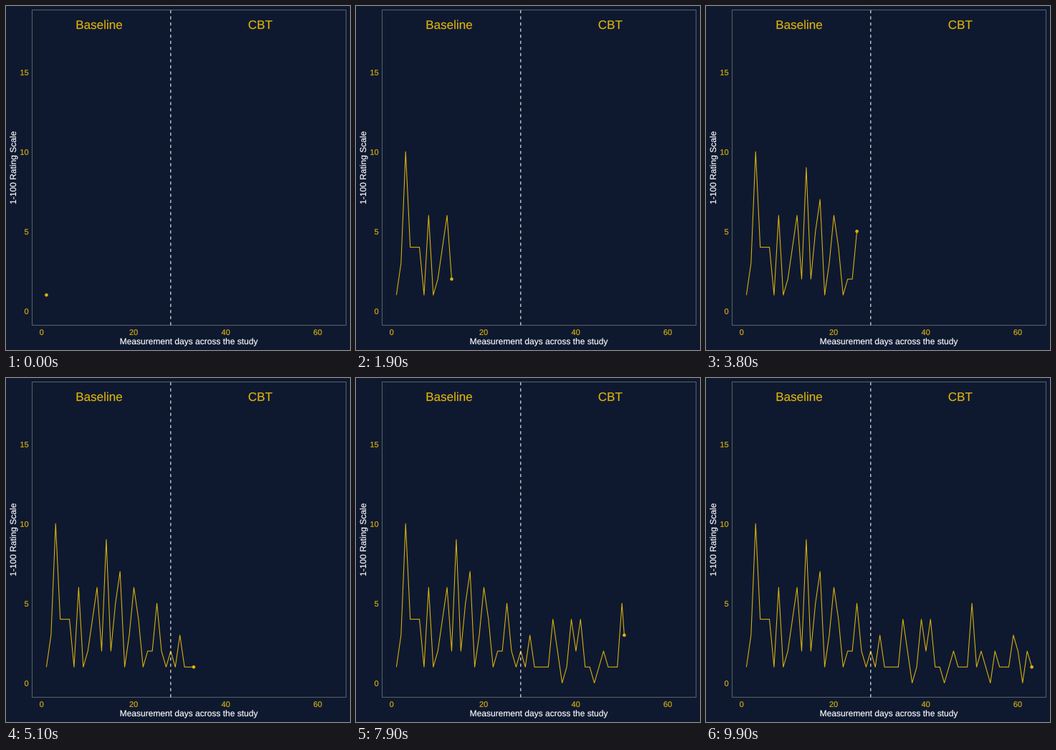
Animation of 480 by 480 pixels, one loop 10000 ms. Source, as a matplotlib script:

```python
import matplotlib.pyplot as plt
from matplotlib.animation import FuncAnimation
from matplotlib.patches import Circle, PathPatch, Rectangle
from matplotlib.textpath import TextPath
from matplotlib.transforms import Affine2D
import numpy as np

SIZE, DPI, FRAMES = 480, 72, 100
BG, GOLD, BORDER = "#0e1930", "#ddb20c", "#5a5f62"
LEFT, RIGHT, TOP, BOTTOM = 36.5, 474.5, 5.5, 445.5
STROKE = 0.5 * 72.27 / 25.4 * 0.75  # half a millimetre in ggplot units

plt.rcParams["font.family"] = "Liberation Sans"

ratings = np.array([
    1, 3, 10, 4, 4, 4, 1, 6, 1, 2, 4, 6, 2, 9, 2, 5, 7, 1, 3, 6, 4,
    1, 2, 2, 5, 2, 1, 2, 1, 3, 1, 1, 1, 1, 4, 2, 0, 1, 4, 2, 4, 1,
    1, 0, 1, 2, 1, 1, 1, 5, 1, 2, 1, 0, 2, 1, 1, 1, 3, 2, 0, 2, 1])
days = np.arange(1, len(ratings) + 1)
# each day is reached on a whole frame, with linear motion in between
arrival = np.round((days - 1) * (FRAMES - 1) / (len(days) - 1))


def px(day):
    return LEFT + (day + 2.1) * (RIGHT - LEFT) / 68.2


def py(rating):
    return BOTTOM - (rating + 0.9) * (BOTTOM - TOP) / 19.8


fig = plt.figure(figsize=(SIZE / DPI, SIZE / DPI), dpi=DPI, facecolor=BG)
ax = fig.add_axes([0, 0, 1, 1])
ax.set_xlim(0, SIZE)
ax.set_ylim(SIZE, 0)
ax.axis("off")


def label(x, y, text, size, color, align=0.5, angle=0):
    """Draw text as outlines so it keeps its sub-pixel position."""
    path = TextPath((0, 0), text, size=size)
    box = path.get_extents()
    place = (Affine2D().translate(-box.x0 - align * box.width, 0)
             .scale(1, -1).rotate_deg(-angle).translate(x, y))
    ax.add_patch(PathPatch(place.transform_path(path), fc=color, ec=color,
                           lw=0.15, snap=False))


ax.add_patch(Rectangle((LEFT, TOP), RIGHT - LEFT, BOTTOM - TOP, fill=False,
                       ec=BORDER, lw=STROKE, snap=False))

for day in (0, 20, 40, 60):
    label(px(day) - 0.3, 459, str(day), 11, GOLD)
for rating in (0, 5, 10, 15):
    label(31.2, py(rating) + 4.4, str(rating), 11, GOLD, align=1)

label(px(12.5), 32, "Baseline", 17.07, GOLD)
label(px(47.5), 32, "CBT", 17.07, GOLD)
label(255.5, 472, "Measurement days across the study", 12, "white")
label(14, 225.5, "1-100 Rating Scale", 12, "white", angle=90)

line, = ax.plot([], [], color=GOLD, lw=STROKE, solid_capstyle="butt",
                solid_joinstyle="round", snap=False)
ax.plot([px(28)] * 2, [BOTTOM, TOP], color="white", lw=STROKE,
        dashes=(4, 4), dash_capstyle="butt", snap=False)
dot = ax.add_patch(Circle((0, 0), 2.3, fc=GOLD, lw=0, snap=False, zorder=3))


def draw(i):
    day = np.interp(i, arrival, days)
    rating = np.interp(day, days, ratings)
    seen = days < day
    line.set_data(px(np.append(days[seen], day)),
                  py(np.append(ratings[seen], rating)))
    dot.set_center((px(day), py(rating)))
    return line, dot


anim = FuncAnimation(fig, draw, frames=FRAMES, interval=100,
                     repeat=True, repeat_delay=0)
plt.show()
```
